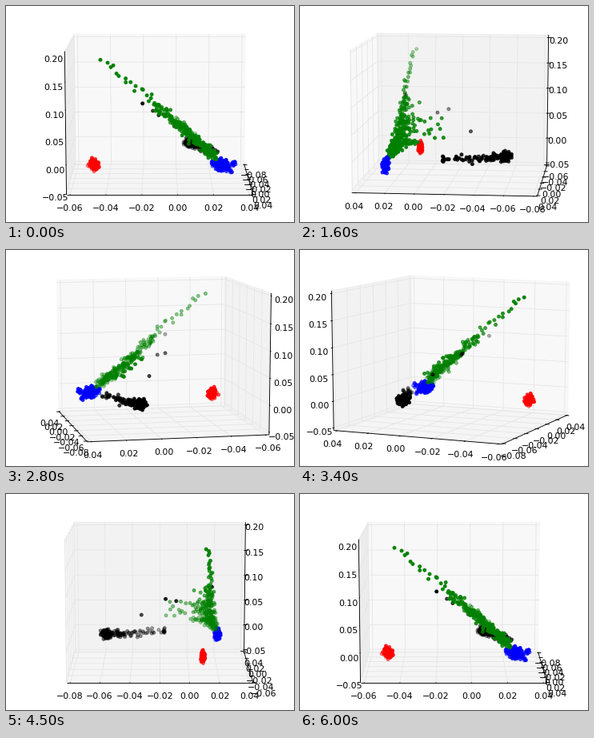
A matplotlib script for the animation above (6.1 s loop, 360 by 270 pixels).

```python
import numpy as np
import matplotlib.pyplot as plt
from matplotlib.animation import FuncAnimation
from matplotlib.collections import LineCollection
from matplotlib.patches import Polygon

W, H, DPI = 360, 270, 72          # one point equals one pixel
FRAMES, INTERVAL, STEP = 61, 100, 6
ELEV, DIST = np.radians(10), 10
CENTER = np.array([192.2, 131.2])
SCALE = np.array([2145, -1660])
EDGE = 0.5 + 1 / 48               # panes reach a little past the data cube
DELTA = 1 / 12
LINE = 0.89

LIMITS = [(-0.08, 0.04, 7), (-0.06, 0.04, 6), (-0.05, 0.20, 6)]
FRONT = [1, 0, 0]                 # dimension each axis moves along to face the eye
PANE_GREY = [0.95, 0.90, 0.925]

rng = np.random.default_rng(7)


def project(points, azim):
    """Pixel positions and eye distances of points in the centred unit cube."""
    x, y, z = np.asarray(points, float).T
    right = -x * np.sin(azim) + y * np.cos(azim)
    toward = x * np.cos(azim) + y * np.sin(azim)
    up = z * np.cos(ELEV) - toward * np.sin(ELEV)
    depth = DIST - toward * np.cos(ELEV) - z * np.sin(ELEV)
    flat = np.column_stack([right, up]) / depth[:, None]
    return CENTER + SCALE * flat, depth


def blob(center, spread, n):
    return rng.normal(center, spread, (n, 3))


def make_red():
    return blob((0.245, -0.374, -0.360), (0.005, 0.012, 0.020), 170)


def make_blue():
    pts = blob((0.350, 0.358, -0.342), (0.007, 0.029, 0.020), 200)
    pts[:, 2] -= 0.2 * (pts[:, 1] - 0.358)
    return pts


def make_black():
    core = blob((-0.322, 0.180, -0.308), (0.012, 0.013, 0.016), 150)
    reach = np.minimum(rng.exponential(0.11, 90), 0.34)
    tail = blob((-0.315, 0.185, -0.308), (0.004, 0.016, 0.016), 90)
    tail += np.outer(reach, (1, 0.36, 0))
    strays = np.linspace((-0.108, 0.085, -0.138), (0.300, -0.097, 0.108), 3)
    return np.vstack([core, tail, strays, (0.034, -0.040, 0.007)])


def streak(t):
    """Points on the line that climbs from the blue cloud to the top."""
    return (0.320, 0.290, -0.260) + np.outer(t, (-0.045, -0.613, 0.694))


def make_green():
    t = rng.gamma(2, 0.115, 240) - 0.04
    t = np.where(t > 0.68, rng.uniform(0.1, 0.6, t.size), t)
    body = streak(t) + blob(0, (0.012, 0.013, 0.018), t.size)
    fan = np.clip(15 * t * (1 - t) ** 5, 0, 1)   # widest just above the foot
    body[:, 0] -= fan * rng.exponential(0.045, t.size)
    side = streak(rng.uniform(0.12, 0.35, 8))
    side[:, 0] = rng.uniform(0.03, 0.18, 8)
    tip = streak(1 - 0.32 * np.linspace(0, 1, 11) ** 0.9)
    tip += blob(0, (0.006, 0.008, 0.010), 11)
    return np.vstack([body, side, tip])


CLOUDS = [((1, 0, 0), make_red()), ((0, 0, 1), make_blue()),
          ((0, 0.5, 0), make_green()), ((0, 0, 0), make_black())]

fig = plt.figure(figsize=(W / DPI, H / DPI), dpi=DPI, facecolor="white")
ax = fig.add_axes([0, 0, 1, 1])
ax.set_xlim(0, W)
ax.set_ylim(H, 0)
ax.axis("off")

panes = [ax.add_patch(Polygon(np.zeros((4, 2)), color=(g, g, g), alpha=0.5,
                              lw=LINE, zorder=1)) for g in PANE_GREY]
grid = ax.add_collection(LineCollection([], colors=[(0.9,) * 3],
                                        linewidths=LINE, zorder=2))
frame_lines = ax.add_collection(LineCollection([], colors="black",
                                               linewidths=LINE, zorder=3))
labels = []
for lo, hi, count in LIMITS:
    values = np.round(np.linspace(lo, hi, count), 2) + 0.0
    labels.append([ax.text(0, 0, f"{v:.2f}".replace("-", "\u2212"),
                           family="DejaVu Sans", size=11, ha="center",
                           va="top", zorder=4) for v in values])
dots = [ax.scatter(p[:, 0], p[:, 1], s=15.8, color=[c], linewidths=LINE)
        for c, p in CLOUDS]


def moved(point, dim, value):
    point = np.array(point, float)
    point[dim] = value
    return point


def draw_box(azim):
    eye = np.array([np.cos(azim), np.sin(azim), 1])
    back = np.where(eye < -1e-9, EDGE, -EDGE)
    grid_segs, line_segs = [], []

    def flat(*points):
        return project(points, azim)[0]

    for i, (_, _, count) in enumerate(LIMITS):
        a, b = (i + 1) % 3, (i + 2) % 3
        low, high = moved(back, a, -EDGE), moved(back, a, EDGE)
        panes[i].set_xy(flat(moved(low, b, -EDGE), moved(low, b, EDGE),
                             moved(high, b, EDGE), moved(high, b, -EDGE)))

        j = FRONT[i]
        edge = moved(back, j, -back[j])
        out = np.sign(edge)
        line_segs.append(flat(moved(edge, i, -EDGE), moved(edge, i, EDGE)))

        for label, at in zip(labels[i], np.linspace(-0.5, 0.5, count)):
            base = moved(back, i, at)
            grid_segs.append(flat(moved(base, a, -back[a]), base,
                                  moved(base, b, -back[b])))
            tick = moved(edge, i, at)
            line_segs.append(flat(
                moved(tick, j, edge[j] + 0.2 * DELTA * out[j]),
                moved(tick, j, edge[j] - 0.1 * DELTA * out[j])))
            spot = moved(edge + 0.7 * DELTA * out, i, at)
            label.set_position(flat(spot)[0])

    grid.set_segments(grid_segs)
    frame_lines.set_segments(line_segs)


def draw_clouds(azim):
    for (color, pts), dot in zip(CLOUDS, dots):
        xy, depth = project(pts, azim)
        shade = -DIST / depth
        far = (shade - shade.min()) / np.ptp(shade)
        rgba = np.column_stack([np.tile(color, (len(pts), 1)), 1 - 0.7 * far])
        dot.set_offsets(xy)
        dot.set_facecolor(rgba)
        dot.set_edgecolor(rgba)
        dot.set_zorder(20 - depth.min())   # nearest cloud goes on top


def update(n):
    azim = np.radians(STEP * n)
    draw_box(azim)
    draw_clouds(azim)
    return []


anim = FuncAnimation(fig, update, frames=FRAMES, interval=INTERVAL,
                     init_func=lambda: update(0), repeat=True, repeat_delay=0)
plt.show()
```
